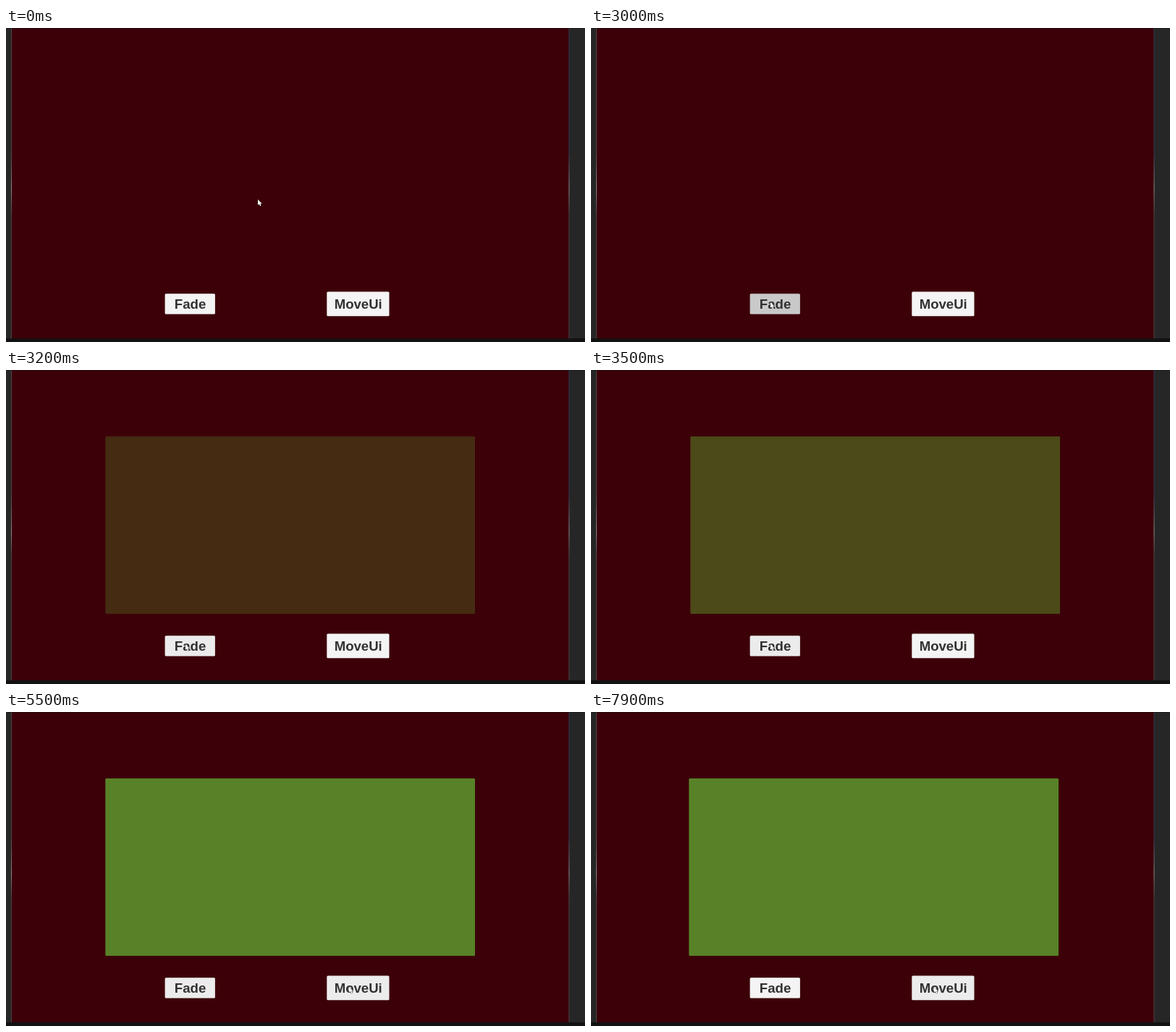
Write an HTML page with a canvas that moves like this. It is 800 px wide and 434 px high and loops after 8000 ms.

```html
<!DOCTYPE html>
<html lang="en">
<head>
<meta charset="utf-8">
<title>Fade and move</title>
<style>
html, body { margin: 0; width: 100%; height: 100%; overflow: hidden; background: #262626; }
canvas { display: block; }
</style>
</head>
<body>
<canvas id="stage" width="800" height="434"></canvas>
<script>
const ctx = document.getElementById('stage').getContext('2d');
const LOOP = 8000, STEP = 100;

const START = { x: 348, y: 237 };
const ABOVE_FADE = { x: 263, y: 346 };
const ON_FADE = { x: 248, y: 379 };
const ON_MOVE = { x: 474, y: 380 };

const FADE_CLICK = 3000, MOVE_CLICK = 7500;

// 0 before start, 1 after end, linear between
const ramp = (time, start, end) => Math.min(1, Math.max(0, (time - start) / (end - start)));
const smooth = p => p * p * (3 - 2 * p);
// Switches on and off again with the buttons' 100 ms colour transition
const pulse = (time, on, off) => ramp(time, on, on + 100) - ramp(time, off, off + 100);

function glide(time, from, to, start, end) {
  const p = smooth(ramp(time, start, end));
  return { x: from.x + (to.x - from.x) * p, y: from.y + (to.y - from.y) * p };
}

function cursorAt(time) {
  if (time < 600) return glide(time, START, ABOVE_FADE, 0, 500);
  if (time < 4000) return glide(time, ABOVE_FADE, ON_FADE, 600, 1400);
  return glide(time, ON_FADE, ON_MOVE, 4000, 4900);
}

function rect(color, x, y, w, h) {
  ctx.fillStyle = color;
  ctx.fillRect(x, y, w, h);
}

function roundRect(color, x, y, w, h) {
  ctx.fillStyle = color;
  ctx.beginPath();
  ctx.roundRect(x, y, w, h, 1.5);
  ctx.fill();
}

function edgeLine(x, top, middle, bottom) {
  const gradient = ctx.createLinearGradient(0, 0, 0, 429);
  gradient.addColorStop(0, top);
  gradient.addColorStop(.4, top);
  gradient.addColorStop(.52, middle);
  gradient.addColorStop(.6, bottom);
  rect(gradient, x, 0, 1, 429);
}

function drawWindow() {
  rect('#262626', 0, 0, 800, 434);
  rect('#3c0008', 8, 0, 770, 429);
  edgeLine(7, '#4c4446', '#8a8486', '#4a4446');
  edgeLine(777.5, '#2c3a50', '#8a8486', '#4a4446');
  rect('rgba(20,20,20,.6)', 0, 0, 800, 1);
  rect('#121212', 0, 429, 800, 5);
}

function drawPanel(time) {
  const sway = 2 * Math.sin(2 * Math.PI * Math.max(0, time - MOVE_CLICK - 100) / 400);
  ctx.globalAlpha = time > FADE_CLICK ? ramp(time, 2790, 4030) : 0;
  roundRect('#588228', 137.3 + sway, 91.8, 510.7, 245.2);
  ctx.globalAlpha = 1;
}

function drawButton(label, held, pressed, x, y, w, h) {
  const light = 244 - 8 * held - 35 * pressed;
  roundRect(`rgb(${light},${light},${light})`, x, y, w, h);
  ctx.fillStyle = '#323232';
  ctx.fillText(label, x + w / 2 + .3, 388);
}

function drawCursor({ x, y }) {
  const arrow = new Path2D('M0 0V7.8L1.8 6.2 3.1 9 4.5 8.4 3.3 5.7H5.6Z');
  ctx.save();
  ctx.translate(x, y);
  ctx.strokeStyle = 'rgba(20,20,20,.65)';
  ctx.fillStyle = '#fff';
  ctx.stroke(arrow);
  ctx.fill(arrow);
  ctx.restore();
}

function draw(time) {
  const press = click => pulse(time, click - 100, click);
  drawWindow();
  drawPanel(time);

  ctx.font = 'bold 18.6px "Liberation Sans", Arial, sans-serif';
  ctx.textAlign = 'center';
  // A clicked button keeps its tint until the other one is clicked
  drawButton('Fade', pulse(time, 1000, MOVE_CLICK - 100), press(FADE_CLICK), 219.6, 367.2, 69.3, 28.2);
  drawButton('MoveUi', pulse(time, 4700, LOOP), press(MOVE_CLICK), 443.3, 364.5, 86.2, 33.7);
  drawCursor(cursorAt(time));
}

function frame() {
  const time = performance.now() % LOOP;
  draw(Math.floor(time / STEP) * STEP);
  requestAnimationFrame(frame);
}
frame();
</script>
</body>
</html>
```
